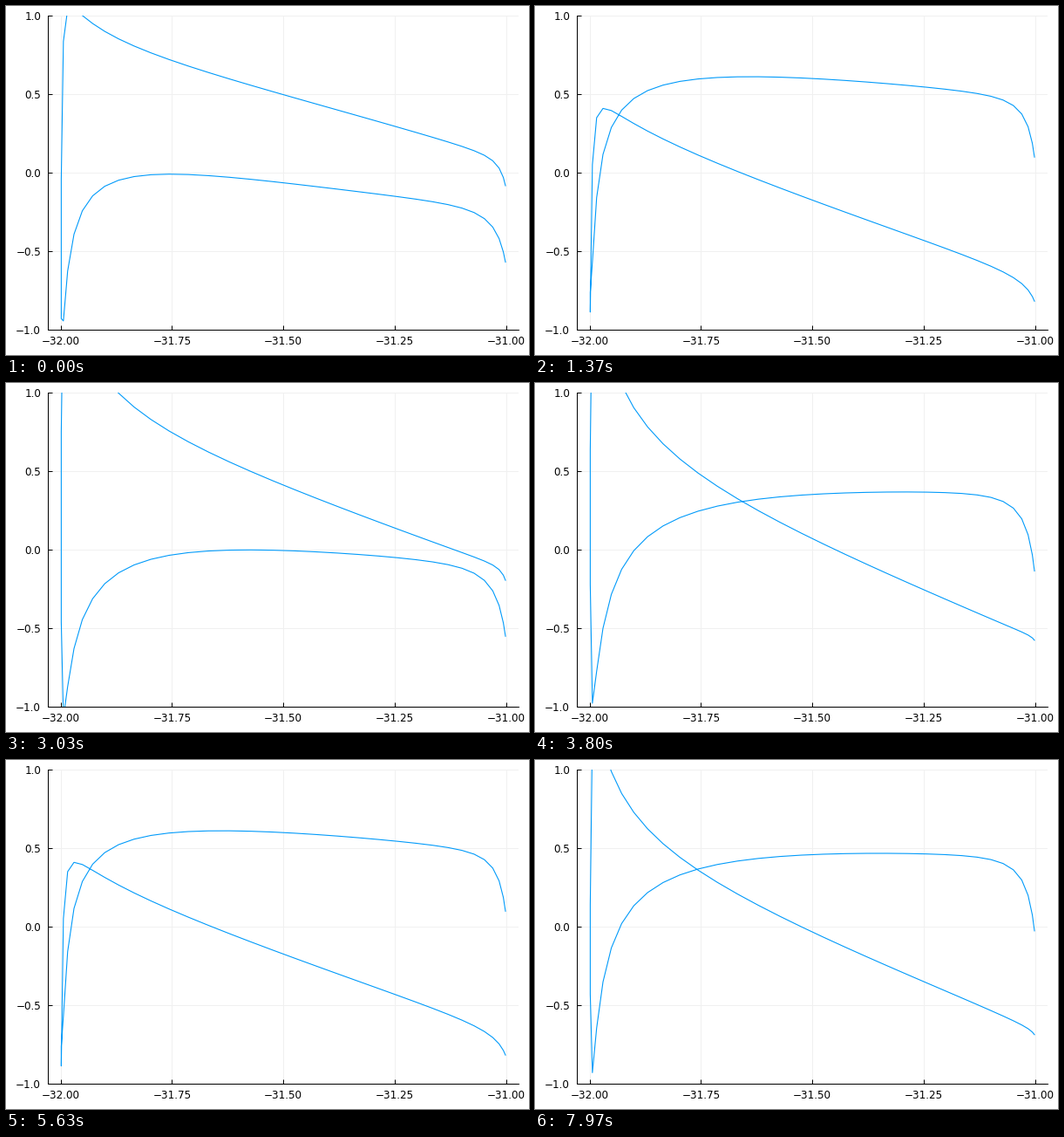
Animation of 600 by 400 pixels, one loop 8 s. Source, as a matplotlib script:

```python
import numpy as np
import matplotlib
import matplotlib.pyplot as plt
from matplotlib.animation import FuncAnimation

matplotlib.rcParams["font.family"] = "DejaVu Sans"

W, H, DPI = 600, 400, 100
PX = 72 / DPI            # one pixel in points
TICK_MS, LOOP_MS = 20, 8000
STEP_MS = 100 / 3        # the flow advances 30 times a second
CYCLE = 64               # flow steps per flapping cycle
HALF = 32                # panels on each side of the foil

# cosine-spaced panel midpoints, leading edge first
beta = (np.arange(HALF) + 0.5) * np.pi / HALF
c, s = np.cos(beta), np.sin(beta)
chord = (1 - c * np.cos(np.pi / CYCLE)) / 2
xs = -32 + np.concatenate([chord[::-1], chord])


def edge(width):
    """Bump at the trailing edge."""
    return 1 / np.cosh((np.pi - beta) / width)


# foil at rest: squared surface speed with a stagnation point at the nose
speed2 = (1.225 + 0.305 * c) * (chord - 0.0009) / (chord + 0.0056)
rest = speed2 - 1 - 0.27 * edge(0.19)

# pressure jump: leading-edge suction plus the inertia of the fluid
suction = np.sqrt(speed2) * (1 + c) / np.sqrt(s ** 2 + 0.0243)
jump_cos = 0.2 * suction + 0.4 + 0.08 * s - 0.03 * c + 0.29 * edge(0.29)
jump_sin = -0.385 * suction + 0.845 - 0.285 * c - 0.55 * edge(0.2)

nose = 0.72 * (1 + c) ** 2 / (s ** 2 + 0.029)
tail = 0.006 * (1 - c) ** 2
startup = 0.125 + 0.11 * chord ** 3


def pressure(n):
    th = 2 * np.pi * n / CYCLE
    kappa = 0.07 * np.cos(th) - 0.1 * np.sin(th)
    mid = (rest + kappa ** 2 * nose + tail * np.cos(th - np.radians(20))
           + 0.01 * np.sin(2 * th))
    jump = jump_cos * np.cos(th) + jump_sin * np.sin(th) - startup * np.exp(-n / 8)
    return np.concatenate([(mid + jump / 2)[::-1], mid - jump / 2])


def label(v, digits):
    return f"{v:.{digits}f}".replace("-", "\u2212")


fig = plt.figure(figsize=(W / DPI, H / DPI), dpi=DPI, facecolor="white")
left, right, top, bottom = 48.1, 588.3, 11.4, 371.4
ax = fig.add_axes([left / W, 1 - bottom / H, (right - left) / W, (bottom - top) / H])
pad = 0.03 * (xs.max() - xs.min())
ax.set_xlim(xs.min() - pad, xs.max() + pad)
ax.set_ylim(-1, 1)

xt = np.linspace(-32, -31, 5)
yt = np.linspace(-1, 1, 5)
ax.set_xticks(xt, [label(v, 2) for v in xt])
ax.set_yticks(yt, [label(v, 1) for v in yt])
ax.tick_params(direction="in", length=5 * PX, width=PX, labelsize=12 * PX)
ax.tick_params(axis="x", pad=6.5 * PX)
ax.tick_params(axis="y", pad=8 * PX)
ax.grid(color="0.94", linewidth=PX)
ax.set_axisbelow(True)
for side in ("top", "right"):
    ax.spines[side].set_visible(False)
for side in ("left", "bottom"):
    ax.spines[side].set_linewidth(PX)

line, = ax.plot(xs, pressure(0), color="#009AFA", linewidth=1.1 * PX,
                solid_joinstyle="round")


def draw(i):
    line.set_ydata(pressure(round(i * TICK_MS / STEP_MS)))
    return line,


anim = FuncAnimation(fig, draw, frames=LOOP_MS // TICK_MS, init_func=lambda: draw(0),
                     interval=TICK_MS, repeat=True, repeat_delay=0)
plt.show()
```
